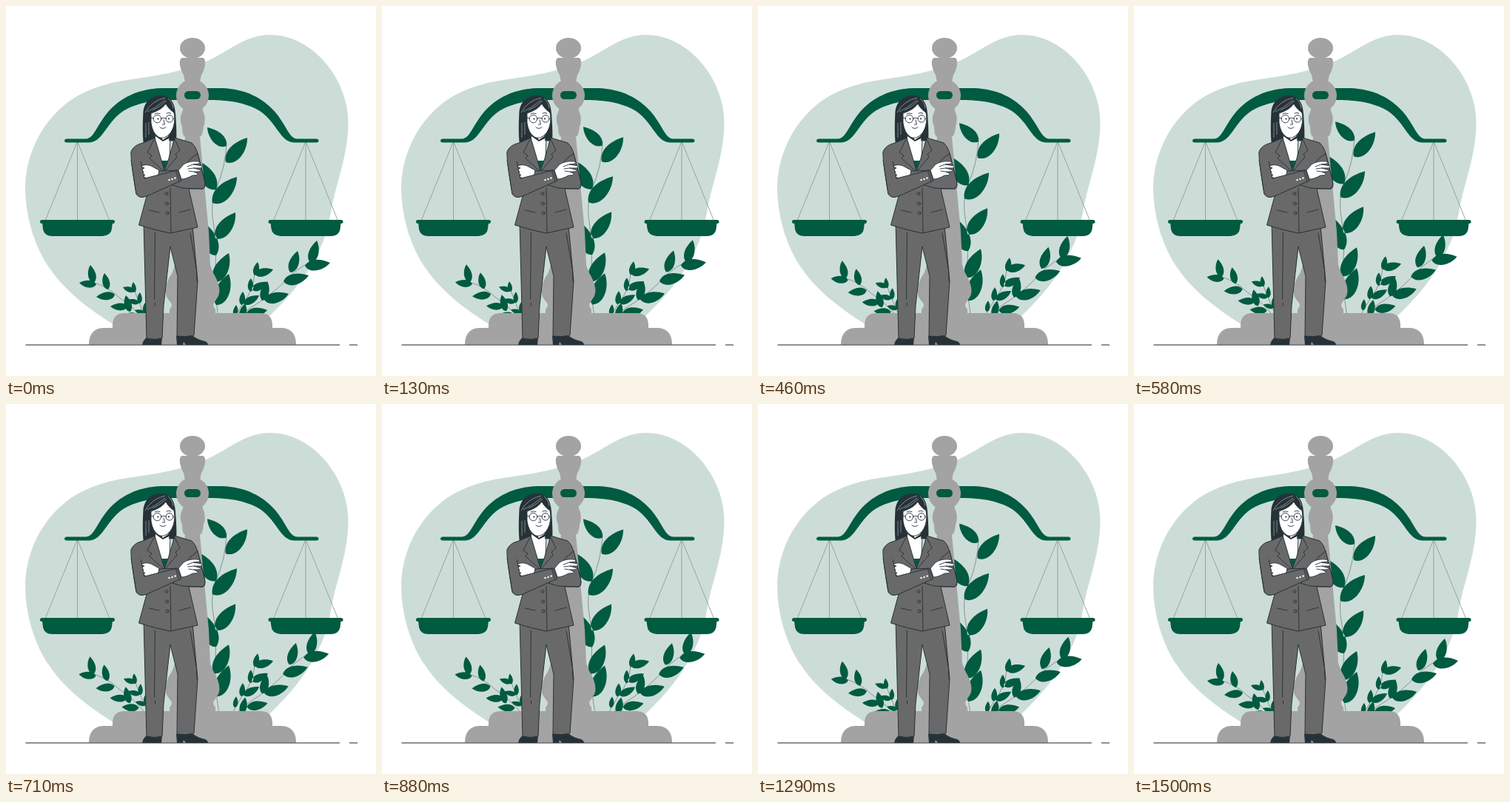
Animation of 500x500 px, one loop 1.54 s. Source, as an HTML page:

```html
<!DOCTYPE html>
<html lang="en">
<head>
<meta charset="utf-8">
<title>Scales of justice</title>
<style>
  html, body { margin: 0; width: 100%; height: 100%; overflow: hidden; background: #fff; }
  svg { display: block; width: 100vw; height: 100vh; }
  .green { fill: #005b40; }
  .stone { fill: #a3a3a3; }
  .ink { fill: #263238; }
  .suit { fill: #696969; stroke: #263238; stroke-width: 1; stroke-linejoin: round; }
  .skin { fill: #fff; stroke: #263238; stroke-width: .9; stroke-linejoin: round; }
  .line { fill: none; stroke: #263238; stroke-width: .9; stroke-linecap: round; stroke-linejoin: round; }
  .cord { fill: none; stroke: #999; stroke-width: .9; }
  .stem { fill: none; stroke: #7f8c88; stroke-width: .9; }
</style>
</head>
<body>
<svg viewBox="0 0 500 500" xmlns="http://www.w3.org/2000/svg">
  <path fill="#ccddd8" d="M260 79 C295 68 318 39 357 39 C415 39 463 100 462.500 158 C462 200 449 232 441 268 C435 300 433 312 418 340 C405 366 384 392 357 418 L340 440 H160 L148 432 C104 405 72 378 51 342 C34 312 26 276 26 245 C27 205 43 167 73 139 C93 120 121 108 152 102 C188 96 226 92 260 79 Z"/>

  <g id="plants"></g>

  <g class="stone">
    <ellipse cx="252" cy="57" rx="17" ry="14"/>
    <path d="M238 70 H266 Q270 71 269 80 Q267 89 264 93 L262 103 H242 L240 93 Q237 89 235 80 Q234 71 238 70 Z"/>
    <path d="M240 136 H265 L266 141 Q271 152 267 163 Q266 175 262 177 L274 305 L276 350 Q279 360 284 368 Q291 383 287 392 L280 403 Q280 407 283 410 V417 H221 V410 Q224 407 224 403 L217 393 Q213 383 220 368 Q226 360 228 350 L230 305 L242 177 Q238 175 238 163 Q233 152 239 141 Z"/>
    <path d="M112 458 V456 Q113 435 133 435 H144 V430 Q145 415 160 415 H344 Q359 415 360 430 V435 H371 Q391 435 392 456 V458 Z"/>
  </g>

  <g id="scales"></g>
  <circle class="stone" cx="252" cy="121" r="22"/>
  <rect class="green" x="241" y="115" width="22" height="11" rx="5.500"/>

  <path stroke="#696e70" stroke-width="1.500" d="M26.500 458 H451 M464 458 H475"/>

  <g id="lawyer">
    <path class="ink" d="M184 458 Q185 452 190 448 H211 L210 458 Z M231 458 L230 446 H253 Q259 451 269 453 Q273 455 273 458 H243 L240 454 L239 458 Z"/>
    <path class="suit" d="M186 292 L190 449 Q200 452 211 449 L213 405 L222 325 L232 365 L231 446 Q243 448 254 445 L259 372 L252 296 Z"/>
    <path class="line" d="M201.500 306 L200.500 396 M201.500 401 V405 M249 307 L257.500 357 L258 372"/>

    <path class="ink" d="M186 188 C184 170 185 153 185.500 143 C187 128 198 121 209 121 C222 121 228 130 229 145 C230 160 231 172 230 183 L218 180 L204 189 Z"/>
    <path class="skin" d="M202 168 L201 184 L213 222 L221 206 L222 176 Z"/>
    <path class="ink" d="M202 166 L212 181 L222 174 L222 178 L212 183 L202 176 Z"/>
    <path class="skin" d="M196 145 C204 142 211 139 216 132 C219 138 224 142 227 144 C229 155 227 166 221 173 Q213 181 206 177 Q198 172 196 158 Z"/>
    <path class="ink" d="M229 160 Q224 168 221 174 L220 182 L230 183 Z"/>
    <path fill="none" stroke="#aab2b5" stroke-width=".7" d="M188 144 Q197 128 215 124 M191 143 Q203 137 215 127 M198 141 Q209 136 217 128 M189 158 V178 M193 157 V174 M219 125 Q225 130 226 138"/>
    <g class="line">
      <circle cx="204.500" cy="152.500" r="5.300"/>
      <circle cx="221" cy="152.300" r="4.900"/>
      <path d="M209.800 152 Q213 150 216.200 152 M196 151 L199.200 152 M201 145.800 Q204 143.800 208 145.500 M217 145 Q220 143.500 223 145 M213 154 L214.500 160 H211.500 M208 164 Q212 167 216 164"/>
    </g>
    <circle class="ink" cx="205.500" cy="152.500" r="1.100"/>
    <circle class="ink" cx="220" cy="152.300" r="1.100"/>

    <path class="green" d="M207 209 H219 L215 223 Z"/>
    <path class="suit" d="M201 178 L185 185 Q172 188 169 197 Q168 207 176 254 Q180 260 190 257 L179.500 296 Q202 303 222 307 Q240 303 259 299 L247 247 H266 Q270 246 268.500 237 L259 199 Q256 189 251 185 L228 178 L220 206 L214 222 Z"/>
    <path class="line" d="M200 180 L191 198 L197 202 L194 206 L213 223 M228 180 L235 195 L229 200 L231 204 L215 223 M222 246 L223 306 M193 276 L207 279 M234 279 L249 275"/>
    <path class="suit" d="M250 206 L259 199 L268.500 237 Q270 246 265 247 L238 246 L202 235 L205 223 L236 222 Z"/>
    <path class="skin" d="M207 222 L196 216 Q188 213 182 217 L187 219 L179 222 Q180 224 186 224 L180 227 Q183 229 188 228 L185 231 Q194 235 205 232 Z"/>
    <path class="suit" d="M182 210 L187 233 L231 222 L237 236 L190 257 Q180 261 176 254 L169 208"/>
    <path class="skin" d="M233 222 L240 214 Q248 209 259 210 Q263 211 262 213 L253 214 L265 216 Q266 218 263 219 L254 219 L264 222 Q264 224 254 224 L260 227 Q259 229 252 229 Q243 234 237 234 Z"/>
    <path class="line" d="M229 222 L234 237 M245 217 L253 214 M246 220 L254 219 M247 223 L254 224"/>
    <g fill="#fff"><circle cx="220.500" cy="235" r="1.200"/><circle cx="224.500" cy="234" r="1.200"/><circle cx="228.500" cy="232.500" r="1.200"/></g>
    <g class="line"><circle cx="217" cy="253.500" r="1.900"/><circle cx="217.500" cy="267" r="1.900"/><circle cx="218" cy="280" r="1.900"/></g>
  </g>
</svg>
<script>
const LOOP = 1540;
const NS = "http://www.w3.org/2000/svg";

function add(parent, tag, attrs) {
  const el = document.createElementNS(NS, tag);
  for (const key in attrs) el.setAttribute(key, attrs[key]);
  return parent.appendChild(el);
}

// Pointed leaf from its base to its tip, fuller on one side.
function leafPath([x, y, tx, ty]) {
  const dx = tx - x, dy = ty - y;
  const side = dx > 0 ? 1 : -1;
  const at = (t, w) => `${(x + dx * t - dy * w * side).toFixed(1)} ${(y + dy * t + dx * w * side).toFixed(1)}`;
  return `M${x} ${y}C${at(.12, .33)} ${at(.68, .3)} ${tx} ${ty}C${at(.6, -.24)} ${at(.2, -.27)} ${x} ${y}Z`;
}

// shift: travel at the top of the sway; turn: degrees about the pivot.
const plants = [
  {
    stem: "M298 184 Q297 217 284 247 Q277 262 279 285 Q285 320 283 355 Q281 385 288 428",
    leaves: [[298,189,272,164], [297,211,326,178], [284,248,260,209], [279,266,312,231],
             [284,337,268,293], [283,314,310,279], [281,373,301,334], [284,404,301,362]],
    shift: [0, -9], turn: 0, pivot: [285, 400]
  },
  {
    stem: "M411 346 Q388 358 374 375 Q354 394 330 408 L306 426",
    leaves: [[411,347,420,317], [404,351,438,347], [384,360,394,331], [375,372,409,364],
             [346,398,353,372], [349,397,382,389], [325,415,353,411], [317,424,323,402]],
    shift: [-1, -7.500], turn: -2, pivot: [375, 370]
  },
  {
    stem: "M336 362 Q334 385 320 402 L306 426",
    leaves: [[336,364,340,346], [336,362,361,356], [331,386,331,368], [332,383,354,373],
             [318,404,320,386], [321,402,342,391], [309,419,311,404]],
    shift: [0, -9], turn: 0, pivot: [315, 410]
  },
  {
    stem: "M116 373 Q138 379 153 394 Q173 407 190 428",
    leaves: [[119,374,114,350], [122,376,99,374], [138,383,133,361], [147,390,122,393],
             [168,413,162,391], [164,406,141,406], [180,419,157,418]],
    shift: [-.5, -9], turn: 0, pivot: [160, 400]
  },
  {
    stem: "M173 382 Q178 398 191 426",
    leaves: [[174,387,172,373], [174,385,158,380], [181,402,181,387], [180,401,164,397],
             [189,416,188,401], [188,415,174,411]],
    shift: [1, -9], turn: 0, pivot: [180, 400]
  }
];

const bed = document.getElementById("plants");
for (const plant of plants) {
  plant.node = add(bed, "g", {});
  add(plant.node, "path", { class: "stem", d: plant.stem });
  add(plant.node, "path", { class: "green", d: plant.leaves.map(leafPath).join("") });
}

const scales = document.getElementById("scales");
for (const flip of ["", "translate(501.5 0) scale(-1 1)"]) {
  const half = add(scales, "g", { transform: flip });
  add(half, "path", { class: "cord", d: "M96.500 183 L53 290 M96.500 183 V290 M96.500 183 L140 290" });
  add(half, "path", { class: "green", d: "M232 111 H210 C177 112 154 125 138 143 C122 162 119 179 108 179.500 H82 Q79 180 79 182 T82 184.500 H112 C134 184 136 149 170 136 C186 130 200 127 232 127 Z" });
  add(half, "rect", { class: "green", x: 46, y: 289, width: 101, height: 5, rx: 2.5 });
  add(half, "path", { class: "green", d: "M49 293 L50 302 Q52 311 63 311 H130 Q142 310 143 301 L144 293 Z" });
}

function draw(time) {
  const sway = (1 - Math.cos(2 * Math.PI * (time % LOOP) / LOOP)) / 2;
  for (const { node, shift: [x, y], turn, pivot } of plants) {
    node.setAttribute("transform", `translate(${x * sway} ${y * sway}) rotate(${turn * sway} ${pivot.join(" ")})`);
  }
}

const start = performance.now();
function tick() {
  draw(performance.now() - start);
  requestAnimationFrame(tick);
}
tick();
</script>
</body>
</html>
```
